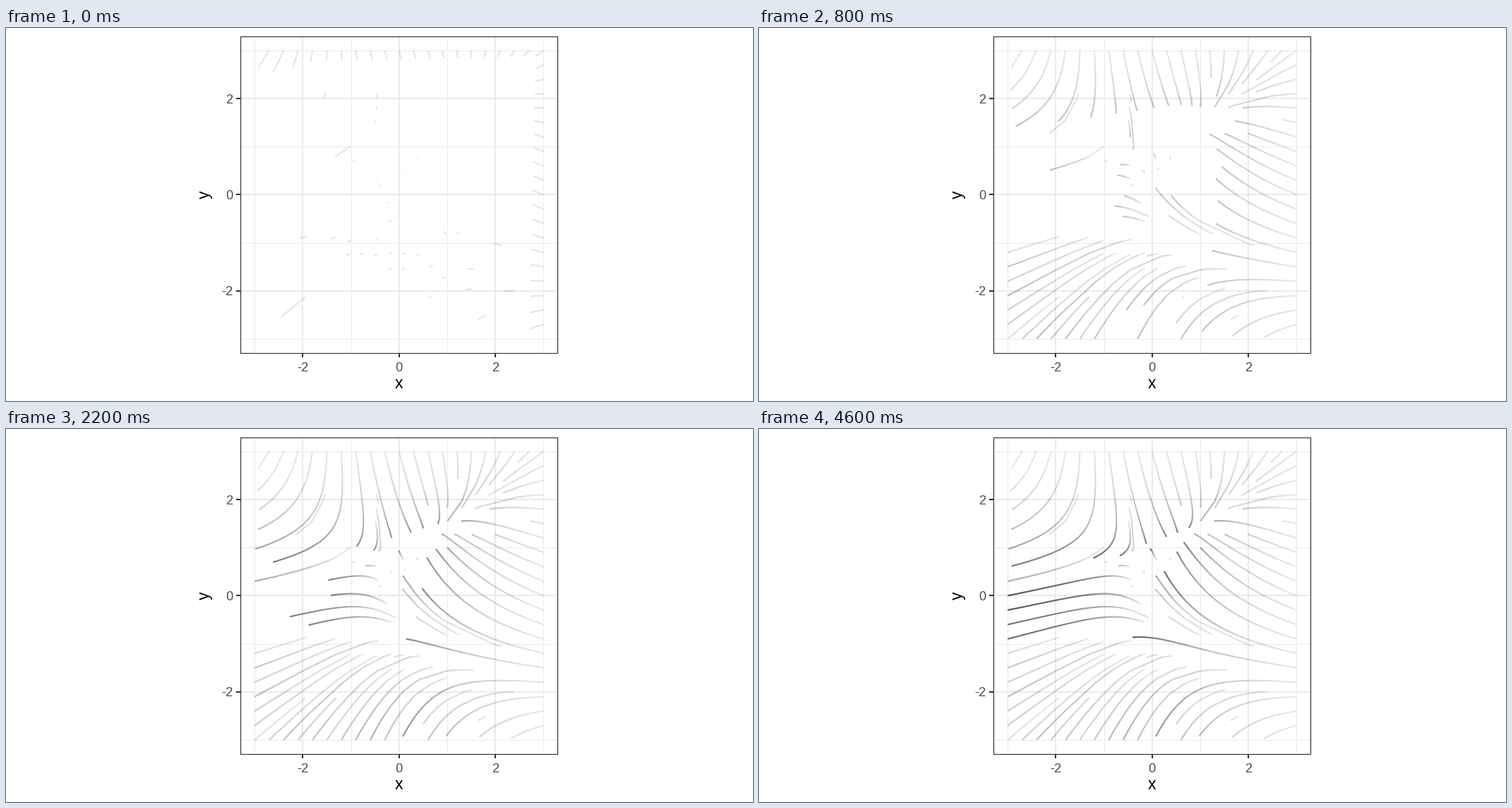
These frames come from a looping animation (1058x529 px, 5 s). A matplotlib script:

```python
import numpy as np
import matplotlib.pyplot as plt
from matplotlib.animation import FuncAnimation
from matplotlib.collections import LineCollection
from matplotlib.patches import Rectangle

W, H, DPI = 1058, 529, 100
PX = 72 / DPI
CX, CY, UNIT = 556.8, 236.4, 68.2
BOX, LIM = 3, 3.3
FRAMES, INTERVAL = 25, 200
STEP = 0.0125                 # time between two points of a line
T0, DT, T_MAX = 0.025, 0.0625, 1.525
SEEDS = CELLS = 21
MAX_GAP = 1.3


def field(p):
    x, y = p
    return np.array([-1 - x * x + y, 1 + x - y * y])


def trace(start, span, sign):
    """Runge-Kutta points after start, until the box is left."""
    p, h, pts = np.array(start, float), sign * STEP, []
    for _ in range(round(span / STEP)):
        k1 = field(p)
        k2 = field(p + h / 2 * k1)
        k3 = field(p + h / 2 * k2)
        k4 = field(p + h * k3)
        p = p + h / 6 * (k1 + 2 * k2 + 2 * k3 + k4)
        if max(abs(p)) > BOX:
            break
        pts.append(p)
    return pts


def cell(p):
    i, j = np.minimum((p + BOX) / (2 * BOX) * CELLS, CELLS - 1).astype(int)
    return i, j


streams = []
taken = set()


def add_stream(start, back=1.0, ahead=1.0):
    """Keep only the points in cells that no earlier line has used."""
    path = trace(start, back, -1)[::-1] + [np.array(start, float)]
    path += trace(start, ahead, 1)
    kept = [p for p in path if cell(p) not in taken]
    taken.update(cell(p) for p in kept)
    if len(kept) > 1:
        streams.append(np.array(kept) * [UNIT, -UNIT] + [CX, CY])


# Seeds run clockwise round the box from the top left corner; the last
# stretch of the left edge is filled downwards from that corner.
side = np.linspace(-BOX, BOX, SEEDS)
ring = ([(x, BOX) for x in side] + [(BOX, y) for y in side[-2::-1]]
        + [(x, -BOX) for x in side[-2::-1]] + [(-BOX, y) for y in side[1:-1]])
meet = 66
for seed in ring[:meet] + ring[:meet - 1:-1]:
    add_stream(seed)

# The line that creeps along the saddle at (0, 1)
add_stream((0.09, 0.735), 0, 1.5)

# Short dashes, then lines that fill the gaps in the middle
for seed in [(0.15, 0.49), (-0.15, 0.46), (0.39, 0.73), (-0.38, 0.18)]:
    add_stream(seed, 0, 0.08)
for seed in [(2.13, -1.06), (1.25, -0.81), (0.99, -0.82), (-0.47, 2.1),
             (-0.49, 1.55), (-0.48, 1.83), (-0.7, 1.21), (-0.59, 0.88),
             (-0.47, 0.61)]:
    add_stream(seed, 0)


def reveal(pts, t):
    """Segments drawn by time t, with their opacity."""
    tip = min(t / STEP, len(pts) - 1)
    s = np.append(np.arange(np.ceil(tip - 1e-6)), tip)
    index = np.arange(len(pts))
    xy = np.column_stack([np.interp(s, index, c) for c in pts.T])
    segs = np.stack([xy[:-1], xy[1:]], axis=1)
    alpha = 0.1 + 0.9 * s[:-1] * STEP / T_MAX
    near = np.hypot(*np.diff(pts, axis=0).T) < MAX_GAP * UNIT
    show = near[s[:-1].astype(int)]
    return segs[show], alpha[show]


fig = plt.figure(figsize=(W / DPI, H / DPI), dpi=DPI, facecolor="white")
ax = fig.add_axes([0, 0, 1, 1])
ax.set(xlim=(0, W), ylim=(H, 0))
ax.axis("off")

left_x, right_x = CX - LIM * UNIT, CX + LIM * UNIT
top_y, low_y = CY - LIM * UNIT, CY + LIM * UNIT


def rule(xs, ys, color, width):
    ax.plot(xs, ys, color=color, lw=width * PX, solid_capstyle="butt", zorder=1)


def label(x, y, text, size, color, **kw):
    ax.text(x, y, text, fontsize=size * PX, color=color,
            family="Liberation Sans", va="baseline", **kw)


for v in (-3, -1, 1, 3, -2, 0, 2):
    x, y = CX + v * UNIT, CY - v * UNIT
    width = 1.1 if v % 2 else 2.1
    rule([x, x], [top_y, low_y], "#ebebeb", width)
    rule([left_x, right_x], [y, y], "#ebebeb", width)
    if v % 2 == 0:
        rule([x, x], [low_y, low_y + 5.7], "#333333", 2.1)
        rule([left_x - 5.7, left_x], [y, y], "#333333", 2.1)
        label(x, 486.7, str(v), 18.3, "#4d4d4d", ha="center")
        label(321.5, y + 6.6, str(v), 18.3, "#4d4d4d", ha="right")

label(CX, 511.3, "x", 22.9, "black", ha="center")
label(288, CY, "y", 22.9, "black", ha="center", rotation=90,
      rotation_mode="anchor")

lines = LineCollection([], linewidths=2.1 * PX, capstyle="butt", zorder=2)
ax.add_collection(lines, autolim=False)

ax.add_patch(Rectangle((left_x + 0.5, top_y + 0.5), 2 * LIM * UNIT - 1,
                       2 * LIM * UNIT - 1, fill=False, ec="#333333",
                       lw=1.2 * PX, zorder=3, snap=True))


def update(k):
    segs, alphas = zip(*(reveal(p, T0 + DT * k) for p in streams))
    alpha = np.concatenate(alphas)
    rgba = np.zeros((len(alpha), 4))
    rgba[:, 3] = alpha
    lines.set_segments(np.concatenate(segs))
    lines.set_color(rgba)
    return [lines]


anim = FuncAnimation(fig, update, frames=FRAMES, interval=INTERVAL,
                     init_func=lambda: update(0), repeat=True, repeat_delay=0)
plt.show()
```
